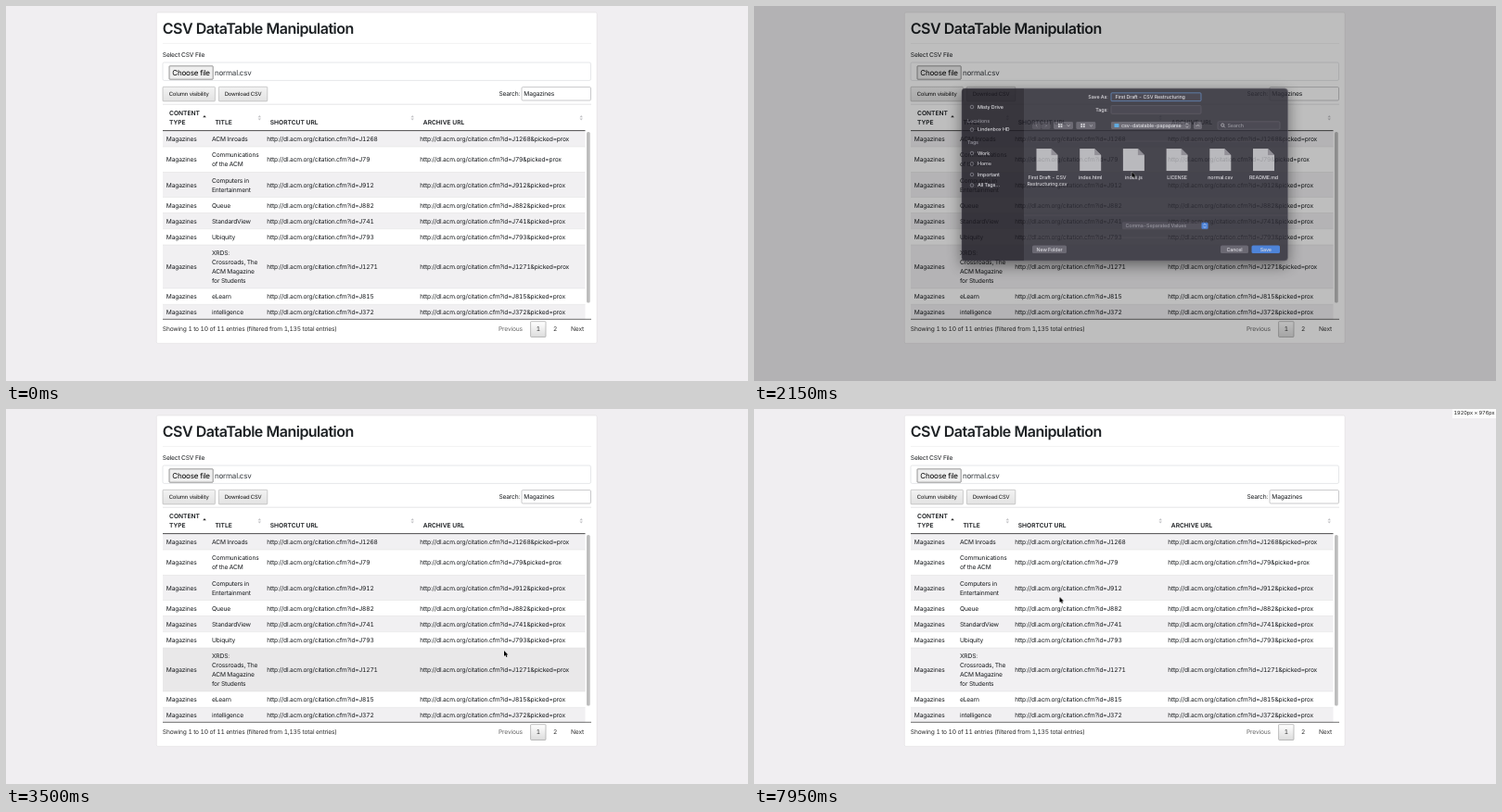
Animation, 800 px wide and 405 px high, one loop 8000 ms. Source, as an HTML page:

```html
<!DOCTYPE html>
<html lang="en">
<head>
<meta charset="utf-8">
<title>CSV DataTable Manipulation</title>
<style>
@property --h { syntax: "<integer>"; inherits: false; initial-value: 976; }
html, body { margin: 0; width: 100%; height: 100%; overflow: hidden; background: #f0eef1; }
svg { position: absolute; left: 0; top: 0; display: block; }
text, #size { font-family: Inter, "Liberation Sans", sans-serif; font-variant-numeric: tabular-nums; letter-spacing: -.025em; text-rendering: geometricPrecision; white-space: pre; }
.h1 { letter-spacing: -.033em; }
.th { letter-spacing: -.002em; font-weight: 600; }
.panel { filter: drop-shadow(0 5px 8px rgba(0, 0, 0, .55)); }
#size { position: absolute; right: 0; top: 0; width: 47px; height: 10px; font-size: 5.6px; line-height: 10px; letter-spacing: -.01em;
  text-align: center; color: #222; background: #fcfcfc; counter-reset: h var(--h); }
#size::after { content: counter(h) "px"; }

#dim, #full, #mini, #shelf, #cursor, #size { animation: 8s linear infinite; }
#hover, #arrow, #hand, .ring, .opening, .pressed { animation: 8s step-end infinite; }
#dim { animation-name: dim; }
#full { animation-name: full; }
#mini { animation-name: mini; }
#shelf { animation-name: shelf; }
#cursor { animation-name: move; }
#size { animation-name: size, tip; animation-timing-function: linear, step-end; }
#hover { animation-name: hover; }
#hand { animation-name: hand; }
#arrow { animation-name: arrow; }
.ring { animation-name: ring; }
.opening { animation-name: opening; }
.pressed { animation-name: pressed; }
.active { animation: active 8s linear infinite; }

@keyframes dim { 0%, 22.5% { opacity: 0 } 24.375% { opacity: .108 } 31.25%, 40.625% { opacity: .51 } 43.125%, 100% { opacity: 0 } }
@keyframes full {
  0%, 22.5% { opacity: 0; transform: translateY(-8px) }
  24.375% { opacity: .5; transform: none }
  28.125%, 39.25% { opacity: 1; transform: translateY(12px) }
  39.375%, 100% { opacity: 0; transform: translateY(12px) }
}
@keyframes mini { 0%, 39.25% { opacity: 0 } 39.375% { opacity: 1 } 40.625% { opacity: .94 } 43.125%, 100% { opacity: 0 } }
@keyframes shelf {
  0%, 46.25% { transform: translateY(23px) }
  50%, 88.75% { transform: none }
  91.875%, 100% { transform: translateY(23px) }
}
@keyframes size { 0%, 46.25% { --h: 976 } 50%, 88.75% { --h: 924 } 91.875%, 100% { --h: 976 } }
@keyframes tip { 0% { opacity: 0 } 46.25% { opacity: 1 } 56.25% { opacity: 0 } 88.75%, 100% { opacity: 1 } }
@keyframes hover { 0% { opacity: 0 } 42.5% { opacity: 1 } 46.25%, 100% { opacity: 0 } }
@keyframes hand { 0% { opacity: 0 } 19.375% { opacity: 1 } 23.125% { opacity: 0 } 39.375% { opacity: 1 } 42.5% { opacity: 0 } 57.5% { opacity: 1 } 80%, 100% { opacity: 0 } }
@keyframes arrow { 0% { opacity: 1 } 19.375% { opacity: 0 } 23.125% { opacity: 1 } 39.375% { opacity: 0 } 42.5% { opacity: 1 } 57.5% { opacity: 0 } 80%, 100% { opacity: 1 } }
@keyframes ring { 0% { opacity: 1 } 65%, 100% { opacity: 0 } }
@keyframes opening { 0% { opacity: 0 } 65%, 100% { opacity: 1 } }
@keyframes pressed { 0% { opacity: 0 } 60%, 100% { opacity: 1 } }
@keyframes active { 0%, 73.75% { opacity: 1 } 76.875%, 100% { opacity: 0 } }
@keyframes move {
  0%, 3.75% { transform: translate(-12px, 195px) }
  4.375% { transform: translate(0, 190px) }
  9.375%, 11.25% { transform: translate(145px, 139px) }
  12.5% { transform: translate(104px, 105px) }
  14.375% { transform: translate(150px, 28px) }
  16.25% { transform: translate(312px, 50px) }
  18.125% { transform: translate(285px, 100px) }
  20%, 22.5% { transform: translate(262px, 94px) }
  24.375% { transform: translate(294.5px, 107.5px); animation-timing-function: ease-out }
  32.5%, 40.625% { transform: translate(541.5px, 264.3px) }
  43.75% { transform: translate(537px, 261px); animation-timing-function: ease-in-out }
  57.5%, 58.125% { transform: translate(59.5px, 391.5px) }
  61.875%, 79.375% { transform: translate(62px, 392px); animation-timing-function: ease-in-out }
  86.875% { transform: translate(240px, 262px); animation-timing-function: ease-out }
  93.125%, 100% { transform: translate(329.5px, 203px) }
}
</style>
</head>
<body>
<svg id="stage" width="800" height="405" viewBox="0 0 800 405"></svg>
<div id="size">1920px × </div>
<script>
const rect = (x, y, w, h, fill, more = '') => `<rect x="${x}" y="${y}" width="${w}" height="${h}" fill="${fill}" ${more}/>`;
const box = (x, y, w, h, fill, stroke, r = 1) => rect(x, y, w, h, fill, `stroke="${stroke}" stroke-width=".6" rx="${r}"`);
const text = (x, y, s, size = 6.667, fill = '#16191c', more = '') =>
  `<text x="${x}" y="${y}" font-size="${size}" fill="${fill}" ${more}>${s.replace(/&/g, '&amp;')}</text>`;
const line = (d, stroke, w = .6) => `<path d="${d}" fill="none" stroke="${stroke}" stroke-width="${w}"/>`;
const shape = (d, fill, more = '') => `<path d="${d}" fill="${fill}" ${more}/>`;
const group = (id, s) => `<g id="${id}">${s}</g>`;
const mid = 'text-anchor="middle"', end = 'text-anchor="end"';

const gradient = (id, a, b) =>
  `<linearGradient id="${id}" x2="0" y2="1"><stop stop-color="${a}"/><stop offset="1" stop-color="${b}"/></linearGradient>`;

// Page
const rows = [
  [152, 'ACM Inroads', 'J1268'],
  [179.5, 'Communications|of the ACM', 'J79'],
  [206.5, 'Computers in|Entertainment', 'J912'],
  [223.5, 'Queue', 'J882'],
  [240.7, 'StandardView', 'J741'],
  [258, 'Ubiquity', 'J793'],
  [305, 'XRDS:|Crossroads, The|ACM Magazine|for Students', 'J1271'],
  [322.3, 'eLearn', 'J815'],
  [338.5, 'intelligence', 'J372'],
];

function table() {
  let top = 135, out = '';
  rows.forEach(([bottom, title, id], i) => {
    const base = (top + bottom) / 2 + 2.5, url = 'http://dl.acm.org/citation.cfm?id=' + id;
    const lines = title.split('|');
    out += rect(169, top, 455.5, bottom - top, i % 2 ? '#fff' : '#f1f0f2');
    if (lines.length == 4) out += rect(169, top, 455.5, bottom - top, '#e9e8e9', 'id="hover"');
    if (i) out += line(`M169 ${top}H624.5`, '#dcdcdc', .5);
    out += text(172.8, base, 'Magazines') + text(281.3, base, url) + text(446.2, base, url + '&picked=prox');
    lines.forEach((s, n) => out += text(222, base + (n - (lines.length - 1) / 2) * 10, s));
    top = bottom;
  });
  return out;
}

const sorter = x => shape(`M${x - 1.7} 120.2h3.4l-1.7-2.2zM${x - 1.7} 121.4h3.4l-1.7 2.2z`, '#c3c3c6');
const head = (x, y, s) => text(x, y, s, 6.667, '#16191c', 'class="th"');
const button = (x, w, s) => box(x, 87.3, w, 15.6, 'url(#btn)', '#adadad', .8) + text(x + w / 2, 97.2, s, 5.9, '#111', mid);

const page = rect(0, 0, 800, 405, '#f0eef1') +
  box(162.3, 7, 474.8, 357.3, '#fff', '#dfdee0', 1.5) +
  text(168.8, 29.8, 'CSV DataTable Manipulation', 16, '#1c2023', 'class="h1" font-weight="600"') +
  line('M169 40.4H631', '#e2e2e2', .5) +
  text(168.8, 54.8, 'Select CSV File') +
  box(169, 61, 461.5, 19.4, '#fff', '#d5d7da', 1.5) +
  box(176, 64.8, 47.2, 14.4, '#efefef', '#555', .6) +
  text(199.6, 74.9, 'Choose file', 8, '#000', mid) +
  text(225, 74.9, 'normal.csv', 8, '#33383d') +
  button(169, 56.4, 'Column visibility') + button(229.4, 52.4, 'Download CSV') +
  text(531.4, 97.3, 'Search:') + box(556, 87.6, 74.5, 14.4, '#fff', '#a5a5a8', 1.2) + text(558.3, 97.2, 'Magazines') +
  line('M169 106.2H631', '#d5d5d7', .6) +
  head(176, 118, 'CONTENT') + head(176, 128, 'TYPE') + head(225.4, 128, 'TITLE') +
  head(284.8, 128, 'SHORTCUT URL') + head(449.8, 128, 'ARCHIVE URL') +
  shape('M212.2 120.2h3.6l-1.8-2.3z', '#333') + [273.3, 438.2, 620.2].map(sorter).join('') +
  table() +
  line('M169 134.6H624.5', '#222', .8) + line('M169 338.3H631', '#333', .7) +
  rect(626, 136, 3.7, 184.5, '#bdbdbd', 'rx="1.6"') +
  text(168.8, 351.3, 'Showing 1 to 10 of 11 entries (filtered from 1,135 total entries)', 6.667, '#2b2b2b') +
  text(531, 351.4, 'Previous', 6.667, '#666') + box(565.6, 340.7, 16.4, 16.8, 'url(#pick)', '#979797', .8) +
  text(573.8, 351.4, '1', 6.667, '#333', mid) + text(592, 351.4, '2', 6.667, '#333', mid) +
  text(609, 351.4, 'Next', 6.667, '#333');

// Save dialog
const name = 'First Draft - CSV Restructuring';
const ink = '#e6e5ea', faint = '#908e98', field = '#35333f', edge = '#55535f', knob = '#5d5b66', blue = '#3a7be0';
const small = (x, y, s, more = '', fill = ink) => text(x, y + 1.9, s, 5.4, fill, more + ' font-weight="500"');
const key = (x, y, w, s, fill = knob) => rect(x, y - 4.3, w, 8.6, fill, 'rx="1.6"') + small(x + w / 2, y, s, mid);
const tool = (x, y, w, fill = knob) => rect(x, y - 4, w, 8, fill, 'rx="1.4"');
const grid = (x, y) => tool(x, y, 21) + rect(x + 5, y - 2, 1.8, 1.6, ink) + rect(x + 7.6, y - 2, 1.8, 1.6, ink) +
  rect(x + 5, y + .4, 1.8, 1.6, ink) + rect(x + 7.6, y + .4, 1.8, 1.6, ink) + line(`M${x + 14.5} ${y - .6}l1.6 1.5 1.6-1.5`, ink);

function form(x, y, find, ring) {
  const bar = y + 30.8;
  return small(x - 3.5, y, 'Save As:', end) + box(x, y - 4.4, 97, 8.8, field, ring, 1) + small(x + 4.5, y, name) +
    small(x - 3.5, y + 13.6, 'Tags:', end) + box(x, y + 9.3, 97, 8.8, field, edge, 1) +
    rect(300, bar - 4, 9.5, 8, '#46444f', 'rx="1.4"') + rect(310, bar - 4, 9.5, 8, '#46444f', 'rx="1.4"') +
    line(`M305.5 ${bar - 1.6}l-1.6 1.6 1.6 1.6M314 ${bar - 1.6}l1.6 1.6-1.6 1.6`, faint) +
    grid(323, bar) + grid(347.3, bar) +
    tool(x, bar, 86) + rect(x + 3.5, bar - 2, 5, 4, '#4fa9e8', 'rx=".6"') + small(x + 11, bar, 'csv-datatable-papaparse') +
    line(`M${x + 80.5} ${bar - .8}l1.4-1.5 1.4 1.5m0 1.6l-1.4 1.5-1.4-1.5`, ink) +
    tool(x + 89, bar, 9) + line(`M${x + 91.8} ${bar + .8}l1.7-1.7 1.7 1.7`, ink) +
    box(find, bar - 4.2, 67, 8.4, field, edge, 1.2) +
    `<circle cx="${find + 5.2}" cy="${bar - .4}" r="1.6" fill="none" stroke="${ink}" stroke-width=".6"/>` +
    line(`M${find + 6.4} ${bar + .8}l1.5 1.5`, ink) + small(find + 10.5, bar, 'Search', '', faint);
}

const files = [name.replace('CSV ', 'CSV|') + '.csv', 'index.html', 'index.js', 'LICENSE', 'normal.csv', 'README.md'];
const file = (s, i) => {
  const x = 316 + i * 46.7;
  return shape(`M${x - 11.5} 146h16l7 7v17h-23z`, '#b9b8bd') + shape(`M${x + 4.5} 146v7h7z`, '#88868f') +
    s.split('|').map((part, n) => small(x, 177 + n * 7, part, mid)).join('');
};
const side = [[101, 'Misty Drive'], [125.5, 'Lindenbox HD'], [151, 'Work'], [162.5, 'Home'], [174, 'Important'], [185.5, 'All Tags…']];
const panel = (y, fill, stroke) => `<g class="panel">${box(224, y, 351.5, 186, fill, stroke, 3.5)}</g>`;

const full = panel(81, '#302e38', '#5b5963') +
  shape('M291 81.3v185.4H227.5q-3.2 0-3.2-3.3V84.5q0-3.2 3.2-3.2z', '#1d1b24') +
  small(230, 116, 'Locations', '', faint) + small(230, 139.5, 'Tags', '', faint) +
  side.map(([y, s]) => small(241, y, s) + `<circle cx="235" cy="${y}" r="1.8" fill="none" stroke="${faint}" stroke-width=".7"/>`).join('') +
  form(385, 90.2, 500, '#5f9bea') + files.map(file).join('') +
  line('M291 138H575M291 218H575M291 242H575', '#45434e', .5) +
  tool(397, 229.3, 93, '#403e49') + small(400.5, 229.3, 'Comma-Separated Values', '', faint) + rect(482.5, 225.8, 7, 7, blue, 'rx="1.2"') +
  line('M484.6 228.6l1.4-1.4 1.4 1.4m0 1.5l-1.4 1.4-1.4-1.4', '#fff') +
  key(300, 254.8, 37, 'New Folder') + key(503, 254.8, 30, 'Cancel') + key(536.5, 254.8, 30.5, 'Save', blue);

const mini = panel(93, '#221f2c', '#4b4956') +
  form(372, 101.9, 474, edge) +
  line('M295 228.5H412M295 253.5H412', '#2d2a38', .5) +
  key(300, 266.7, 37, 'New Folder') + key(340.5, 266.7, 30, 'Cancel') + key(374, 266.7, 30, 'Save');

// Download shelf
const doc = shape('M8.2 392h3.2l1.8 1.8v4.4h-5z', '#c4c5c8') + line('M9.2 395h3M9.2 396.6h3', '#55565a', .5);
const bold = 'font-weight="600"';
const shelf = rect(0, 383.3, 800, 23, '#292a2d') + line('M0 383.5H800', '#3c3d41', .6) +
  rect(0, 383.5, 97.4, 22, '#4a4a4e', 'class="pressed"') + line('M97.6 384V405', '#505155', .6) + doc +
  '<circle class="ring" cx="10.6" cy="395.1" r="5.1" fill="none" stroke="#e6e7ea" stroke-width="1.1"/>' +
  text(19, 397.3, 'First Draft - C....csv', 5.8, '#f1f1f3', bold + ' class="ring"') +
  text(19, 397.3, 'Opening First Draft –', 5.7, '#d0d0d3', 'class="opening"') +
  line('M85.7 396.2l2-2 2 2', '#d5d6d9', .8) +
  box(751.6, 388.6, 33, 12.8, '#34353a', '#3f4045', 1.6) + text(768.1, 397.1, 'Show all', 5.6, '#a2a3a7', mid) +
  `<g class="active">${box(751.6, 388.6, 33, 12.8, '#1d2530', '#2c3a4c', 1.6)}${text(768.1, 397.1, 'Show all', 5.6, '#7fb0f5', mid + ' ' + bold)}</g>` +
  line('M791 393.2l3.8 3.8m0-3.8l-3.8 3.8', '#e0e1e4', .9);

const outline = 'stroke-width=".6" stroke-linejoin="round"';
const cursor =
  `<g id="arrow">${shape('M0 0v6l1.4-1.2 1 2.3 1.1-.5-1-2.2h1.9z', '#000', `stroke="#fff" ${outline} paint-order="stroke"`)}</g>` +
  `<g id="hand">${shape('M0 .6q.6-.9 1.2 0v2l2.6.6q.9.3.7 1.4l-.5 2.4h-3.2l-2.2-2.6q.1-1 1.4-.2z', '#fff', `stroke="#000" ${outline}`)}</g>`;

document.getElementById('stage').innerHTML =
  `<defs>${gradient('btn', '#f3f3f3', '#e2e2e2')}${gradient('pick', '#fff', '#dcdcdc')}</defs>` +
  page + rect(0, 0, 800, 405, '#000', 'id="dim"') +
  group('full', full) + group('mini', mini) + group('shelf', shelf) + group('cursor', cursor);
</script>
</body>
</html>
```
